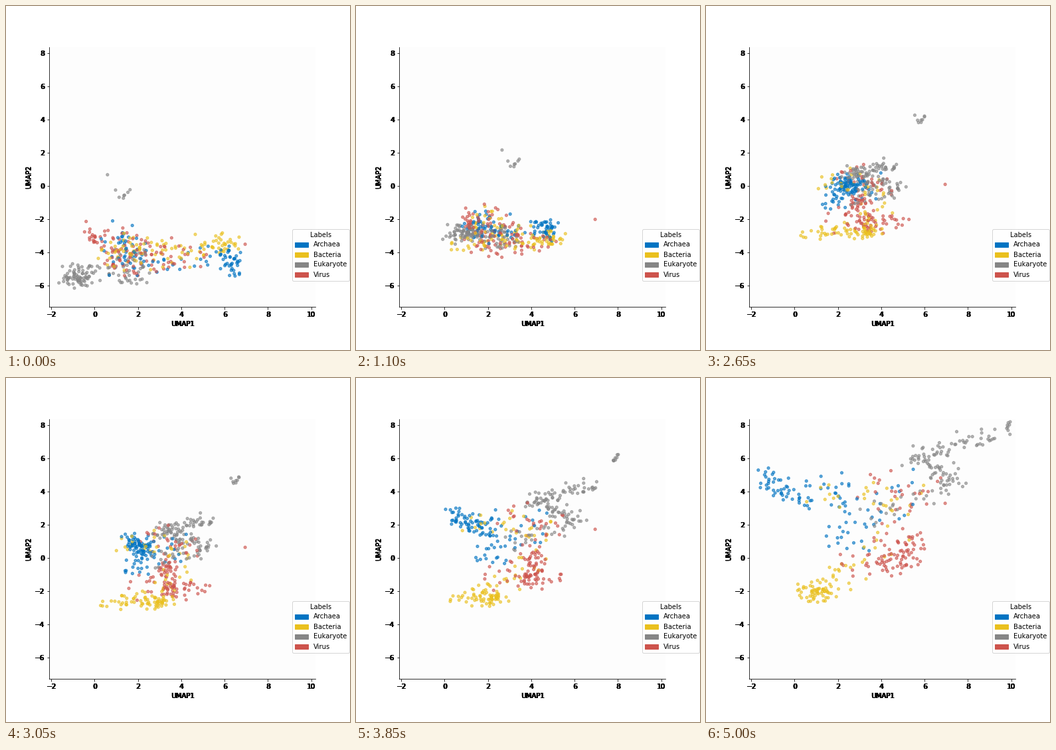
A matplotlib script for the animation above (5050 ms loop, 518x518 px).

```python
import numpy as np
import matplotlib.pyplot as plt
from matplotlib.animation import FuncAnimation
from matplotlib.colors import to_rgba
from matplotlib.patches import Patch

SIZE, DPI = 518, 72
STEPS, INTERVAL = 101, 50
BOX = (0.125, 0.125, 0.775, 0.755)
COLORS = {
    "Archaea": "#0073C2",
    "Bacteria": "#EAC01E",
    "Eukaryote": "#868686",
    "Virus": "#CD534C",
}


def along(knots, u):
    """Points at fractions u of a polyline through evenly timed knots."""
    knots = np.array(knots)
    at = np.linspace(0, 1, len(knots))
    return np.column_stack([np.interp(u, at, knots[:, k]) for k in (0, 1)])


def swarm(rng, n, first, last, spread=1.2, bias=1.0):
    """Start and end places: both follow a path, with jitter that grows along it."""
    u = np.linspace(0, 1, n) ** bias
    reach = spread * (0.6 + 0.6 * u)[:, None]

    def place(knots):
        return along(knots, u) + reach * rng.triangular(-1, 0, 1, (n, 2))

    return place(first), place(last)


def build_points():
    rng = np.random.default_rng(5)
    swarms = [
        ("Archaea", swarm(
            rng, 105,
            [(6.3, -4.9), (6.3, -4.2), (1.8, -4.6), (1.2, -3.0), (2.2, -4.6)],
            [(-1.3, 5.0), (-0.2, 3.6), (2.2, 4.3), (2.4, 0.5), (5.4, 5.2)],
            bias=1.3)),
        ("Bacteria", swarm(
            rng, 110,
            [(6.2, -3.4), (5.4, -3.6), (0.3, -3.8), (4.6, -4.0), (1.5, -4.0), (2.2, -4.0)],
            [(1.3, -2.2), (1.0, -1.9), (0.9, -1.9), (2.8, -0.6), (5.2, 4.0), (0.6, 4.0)],
            bias=1.3)),
        ("Eukaryote", swarm(
            rng, 125,
            [(-0.6, -5.7), (-1.0, -5.5), (-1.0, -5.5), (0.0, -5.0), (2.2, -5.4), (1.5, -4.2)],
            [(9.4, 7.4), (7.2, 6.9), (5.5, 6.0), (6.8, 5.3), (7.2, 4.2), (3.2, 2.5)],
            spread=0.95)),
        ("Virus", swarm(
            rng, 115,
            [(-0.2, -2.5), (0.2, -3.5), (1.8, -5.2), (4.8, -4.1), (1.2, -3.9), (2.2, -4.3), (1.0, -3.6)],
            [(5.6, 1.3), (5.3, 0.5), (4.6, -0.4), (4.9, 0.0), (2.6, -0.6), (6.6, 4.4), (2.8, 3.7)])),
        # A small far-off islet and one stray
        ("Eukaryote", swarm(
            rng, 8,
            [(0.6, 0.7), (1.2, -0.8), (1.6, -0.25)],
            [(9.95, 7.45), (9.8, 7.8), (9.9, 8.25)],
            spread=0.1, bias=0.6)),
        ("Virus", swarm(rng, 1, [(6.95, -3.5)], [(6.95, 3.3)], spread=0)),
    ]
    start = np.vstack([s for _, (s, _) in swarms])
    end = np.vstack([e for _, (_, e) in swarms])
    rgba = np.array([to_rgba(COLORS[name], 0.6) for name, (s, _) in swarms for _ in s])
    order = rng.permutation(len(start))
    return start[order], end[order], rgba[order]


def add_axes(name, shift=0):
    left, *rest = BOX
    ax = fig.add_axes((left + shift / SIZE, *rest), label=name)
    ax.set(xlim=(-2.1, 10.2), ylim=(-7.28, 8.36), xlabel="UMAP1", ylabel="UMAP2")
    ax.set_xticks(range(-2, 11, 2))
    ax.set_yticks(range(-6, 9, 2))
    ax.spines[["top", "right"]].set_visible(False)
    return ax


plt.rcParams.update({"font.family": "DejaVu Sans", "font.size": 10})
fig = plt.figure(figsize=(SIZE / DPI, SIZE / DPI), dpi=DPI, facecolor="white")

start, end, rgba = build_points()
ax = add_axes("main")
ax.set_facecolor("#FDFDFD")
dots = ax.scatter(*start.T, s=16, c=rgba, linewidths=1.2)

# Bare axes on top overprint the labels, some a pixel to the right
for k in range(4):
    layer = add_axes(f"layer{k}", shift=k % 2)
    layer.patch.set_visible(False)
    layer.spines[:].set_visible(False)
    layer.tick_params(color="none")

fig.legend(
    handles=[Patch(color=c, label=name) for name, c in COLORS.items()],
    title="Labels",
    loc="lower left",
    bbox_to_anchor=(430.6 / SIZE, 104.5 / SIZE),
    borderaxespad=0,
)


def update(i):
    t = i / (STEPS - 1)
    dots.set_offsets(start + (end - start) * t)
    return (dots,)


anim = FuncAnimation(fig, update, frames=STEPS, interval=INTERVAL,
                     repeat=True, repeat_delay=0, blit=False)
plt.show()
```
